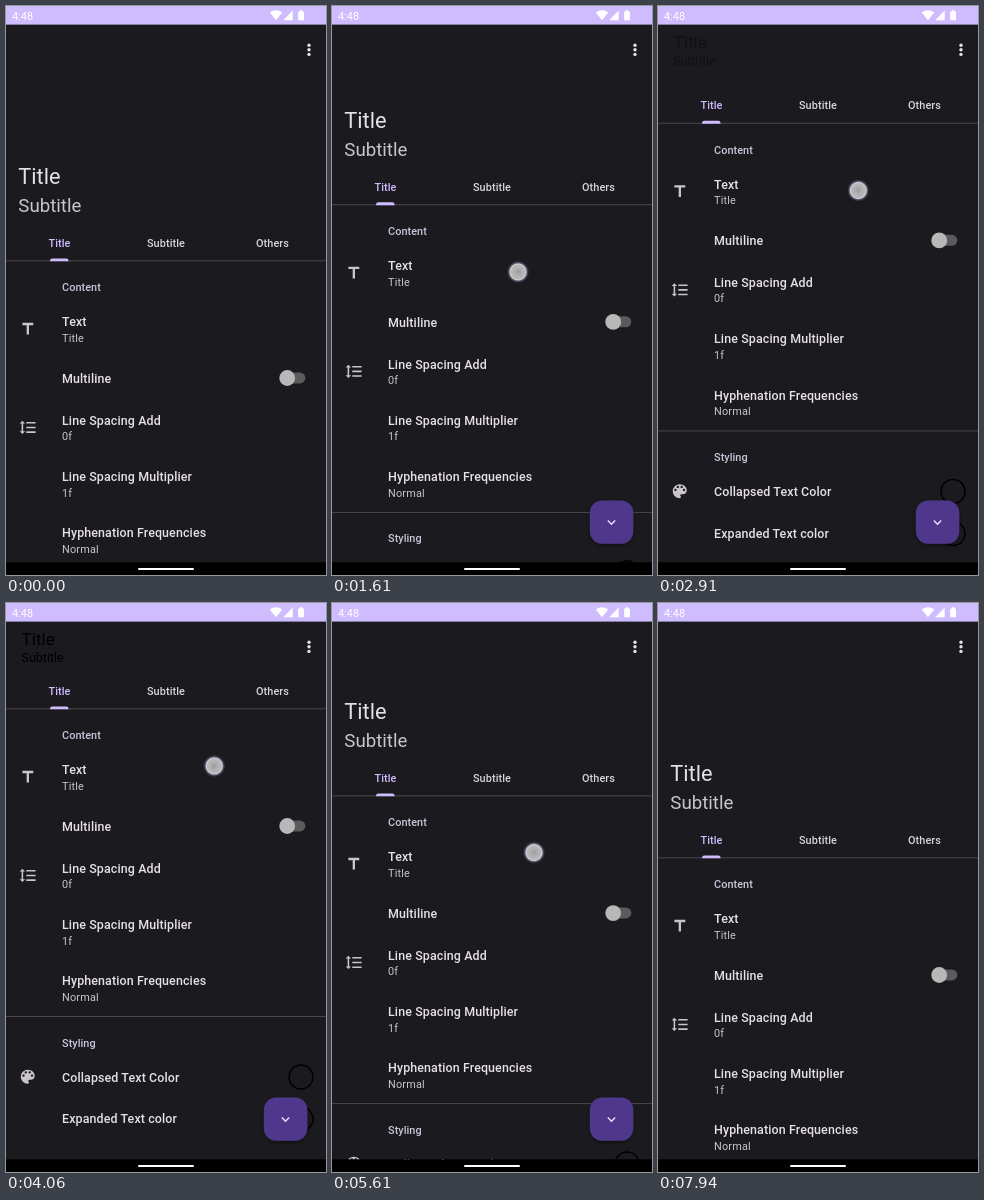
Write an HTML page that moves like this. It is 320 by 569 pixels and loops after 8030 ms.

```html
<!DOCTYPE html>
<html lang="en">
<head>
<meta charset="utf-8">
<title>Collapsing toolbar</title>
<style>
  html, body { margin: 0; width: 100%; height: 100%; overflow: hidden; background: #1b1a1e; }
  svg { display: block; width: 100%; height: 100%; font-family: Roboto, "Open Sans", sans-serif; }
  .item { font-size: 12.45px; font-weight: 500; letter-spacing: .117px; fill: #e6e1e5; }
  .note { font-size: 10.9px; letter-spacing: .19px; fill: #c9c5ca; }
  .section { font-size: 10.9px; font-weight: 500; letter-spacing: .05px; fill: #ccc5da; }
  .tab { font-size: 10.9px; font-weight: 500; letter-spacing: .078px; fill: #d8d3dc; text-anchor: middle; }
  .tab.active { fill: #cfbcff; }
  .icon { fill: #cac5cd; }
  .line { fill: #49474d; }
</style>
</head>
<body>
<svg viewBox="0 0 320 569" preserveAspectRatio="none">
  <defs>
    <radialGradient id="touch">
      <stop offset="0" stop-color="#9b9b9f"/>
      <stop offset=".3" stop-color="#aeaeb1"/>
      <stop offset=".62" stop-color="#b9b9bc"/>
      <stop offset=".72" stop-color="#d0ced8"/>
      <stop offset=".8" stop-color="#7c7890" stop-opacity=".75"/>
      <stop offset="1" stop-color="#4a4560" stop-opacity="0"/>
    </radialGradient>
    <filter id="shadow" x="-30%" y="-30%" width="160%" height="160%">
      <feDropShadow dx="0" dy="1.5" stdDeviation="2" flood-color="#000" flood-opacity=".45"/>
    </filter>
  </defs>
  <rect width="320" height="569" fill="#1b1a1e"/>

  <g id="page">
    <g id="heading">
      <text x="12.3" y="178.4" font-size="21.8" fill="#e6e1e5">Title</text>
      <text x="12.3" y="205.8" font-size="18.7" fill="#cac5cd">Subtitle</text>
    </g>
    <rect class="line" y="254.3" width="320" height="1"/>
    <path d="M44 255.2v-.4a2.4 2.4 0 0 1 2.4-2.4h13.8a2.4 2.4 0 0 1 2.4 2.4v.4z" fill="#cfbcff"/>
    <g id="list"></g>

    <g class="icon">
      <path transform="translate(12.5 313.7) scale(.778)" d="M5 4v3h5.5v12h3V7H19V4z"/>
      <path transform="translate(12.5 412.1) scale(.778)"
        d="M6 7h2.5L5 3.5 1.5 7H4v10H1.5L5 20.5 8.5 17H6zM10 5v2h12V5zM10 19h12v-2H10zM10 13h12v-2H10z"/>
      <g transform="translate(12.4 613.4) scale(.778)">
        <path d="M12 3a9 9 0 0 0 0 18c.83 0 1.5-.67 1.5-1.5 0-.39-.15-.74-.39-1.01-.23-.26-.38-.61-.38-.99 0-.83.67-1.5 1.5-1.5H16c2.76 0 5-2.24 5-5C21 6.58 16.97 3 12 3z"/>
        <g fill="#1b1a1e">
          <circle cx="6.5" cy="10.5" r="1.5"/>
          <circle cx="9.5" cy="6.5" r="1.5"/>
          <circle cx="14.5" cy="6.5" r="1.5"/>
          <circle cx="17.5" cy="10.5" r="1.5"/>
        </g>
      </g>
    </g>

    <rect x="276" y="366.4" width="23.3" height="11" rx="5.5" fill="#5b5a5d"/>
    <circle cx="281.2" cy="372" r="7.9" fill="#b9b8b8"/>
    <rect class="line" y="562" width="320" height="1"/>
    <g fill="none" stroke="#000" stroke-width="1.5">
      <circle cx="295" cy="623" r="12"/>
      <circle cx="295" cy="665" r="12"/>
    </g>
  </g>

  <g id="small" opacity="0">
    <text x="15.6" y="42.2" font-size="17.1">Title</text>
    <text x="15.6" y="59.2" font-size="12.45">Subtitle</text>
  </g>
  <g fill="#e6e1e5">
    <circle cx="303" cy="39.2" r="1.7"/>
    <circle cx="303" cy="43.8" r="1.7"/>
    <circle cx="303" cy="48.4" r="1.7"/>
  </g>

  <rect width="320" height="18.6" fill="#cfbcff"/>
  <g fill="#fff">
    <text x="6" y="13.5" font-size="10.9">4:48</text>
    <path d="M270 14.2 263.8 6.6Q270 2 276.2 6.6z"/>
    <path d="M277.3 14.2h9.4V4.6z"/>
    <path d="M292.2 5.4h1.6V4.2h2.6v1.2h1.6v8.8h-5.8z"/>
  </g>

  <rect y="556.3" width="320" height="12.7"/>
  <rect x="132" y="562" width="56" height="2" rx="1" fill="#fff"/>

  <g id="fab">
    <rect x="257.9" y="494.4" width="43.4" height="43.4" rx="12.2" fill="#4f378b" filter="url(#shadow)"/>
    <path d="M275.8 514.5l3.7 3.7 3.7-3.7" fill="none" stroke="#eaddff" stroke-width="1.5"/>
  </g>
  <circle id="finger" r="11.2" fill="url(#touch)"/>
</svg>
<script>
  const LOOP = 8030;
  const FAB_IN = 720, FAB_OUT = 6880, FAB_TIME = 190;
  const TOUCH_DOWN = 560, TOUCH_UP = 6980;
  const get = id => document.getElementById(id);

  // class, x, baseline, text
  const texts = [
    ['tab active', 53.5, 241, 'Title'],
    ['tab', 160, 241, 'Subtitle'],
    ['tab', 266.5, 241, 'Others'],
    ['section', 56, 285.4, 'Content'],
    ['item', 56, 320.4, 'Text'],
    ['note', 56, 335.8, 'Title'],
    ['item', 56, 376.8, 'Multiline'],
    ['item', 56, 418.6, 'Line Spacing Add'],
    ['note', 56, 434, '0f'],
    ['item', 56, 475, 'Line Spacing Multiplier'],
    ['note', 56, 490.5, '1f'],
    ['item', 56, 531.4, 'Hyphenation Frequencies'],
    ['note', 56, 546.9, 'Normal'],
    ['section', 56, 592.5, 'Styling'],
    ['item', 56, 627.5, 'Collapsed Text Color'],
    ['item', 56, 669.3, 'Expanded Text color']
  ];
  get('list').innerHTML = texts.map(([cls, x, y, text]) =>
    `<text class="${cls}" x="${x}" y="${y}">${text}</text>`).join('');

  // time, scroll offset
  const scroll = [
    [720, 0], [1610, 56], [2910, 137.5], [3100, 149], [4230, 149],
    [4790, 114.5], [5610, 62], [6390, 22], [6880, 0]
  ];
  // time, x, y
  const drag = [
    [560, 178, 328], [720, 179, 322], [1610, 186, 266], [2910, 200.3, 184.5],
    [3100, 202, 173], [3320, 205, 163], [4230, 209, 163], [4790, 207.5, 198],
    [5610, 202, 249.5], [6390, 198.5, 288], [6880, 196, 310], [6980, 196, 312]
  ];

  const clamp = v => Math.min(1, Math.max(0, v));
  const ramp = (v, from, to) => clamp((v - from) / (to - from));

  function at(keys, t, col = 1) {
    let i = 1;
    while (i < keys.length - 1 && keys[i][0] < t) i++;
    const a = keys[i - 1], b = keys[i];
    return a[col] + (b[col] - a[col]) * ramp(t, a[0], b[0]);
  }

  function draw(t) {
    const offset = at(scroll, t);
    get('page').setAttribute('transform', `translate(0 ${-offset})`);
    get('heading').setAttribute('opacity', 1 - ramp(offset, 116, 130));
    get('small').setAttribute('opacity', ramp(offset, 130, 149));

    const shown = ramp(t, FAB_IN, FAB_IN + FAB_TIME) - ramp(t, FAB_OUT, FAB_OUT + FAB_TIME);
    const size = shown * (2 - shown);
    get('fab').setAttribute('opacity', shown);
    get('fab').setAttribute('transform',
      `translate(279.6 516.1) scale(${size}) translate(-279.6 -516.1)`);

    const touching = t >= TOUCH_DOWN && t < TOUCH_UP;
    get('finger').setAttribute('opacity', touching ? 1 : 0);
    get('finger').setAttribute('cx', at(drag, t, 1));
    get('finger').setAttribute('cy', at(drag, t, 2));
  }

  const start = performance.now();
  function frame() {
    draw((performance.now() - start) % LOOP);
    requestAnimationFrame(frame);
  }
  frame();
</script>
</body>
</html>
```
